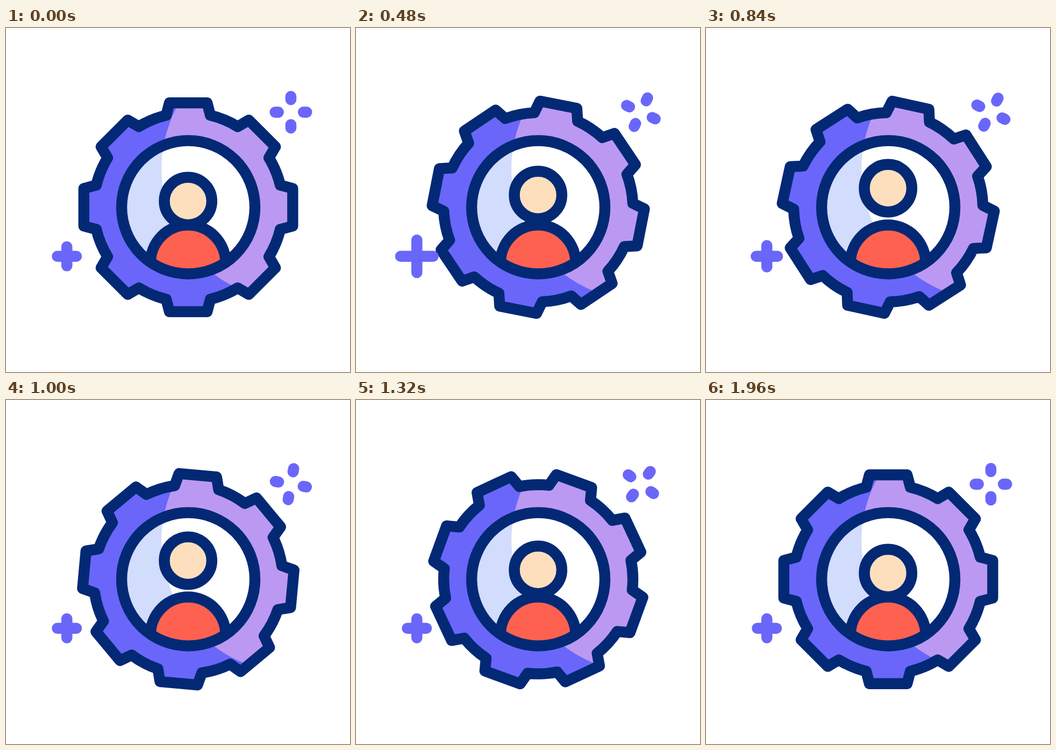
Recreate the animation shown at these times as an HTML page. Size 640x640 px, loop 2000 ms.

```html
<!DOCTYPE html>
<html lang="en">
<head>
<meta charset="utf-8">
<title>Profile settings</title>
<style>
  html, body { margin: 0; width: 100%; height: 100%; overflow: hidden; background: #fff; }
  svg { display: block; width: 100%; height: 100%; }

  .line { stroke: #032975; stroke-width: 20.4; stroke-linejoin: round; }
  .accent { fill: none; stroke: #6a66fa; stroke-width: 20.6; stroke-linecap: round; }

  .spin, .unspin, .sparkle, .plus, .head {
    animation: turn 2s cubic-bezier(.6, 0, .4, 1) infinite;
  }
  .spin { --turn: 180deg; }
  .unspin { --turn: -180deg; }
  .sparkle { animation-name: twirl; }
  .plus { animation-name: grow; }
  .head { animation-name: nod; }

  @keyframes turn {
    0%, 4% { rotate: 0deg; }
    94%, 100% { rotate: var(--turn); }
  }
  @keyframes twirl {
    0%, 2% { rotate: 0deg; }
    96%, 100% { rotate: 360deg; }
  }
  @keyframes grow {
    0%, 3%, 49%, 100% { d: path("M-17.7 0H17.7M0 -17.7V17.7"); }
    28% { d: path("M-30.6 0H30.6M0 -30.6V30.6"); }
  }
  @keyframes nod {
    0%, 6.5%, 80%, 100% { translate: 0 0; }
    42.5%, 44% { translate: 0 -24px; }
  }
</style>
</head>
<body>
<svg viewBox="0 0 640 640">
  <defs>
    <path id="gear"/>
    <clipPath id="gearClip"><use href="#gear"/></clipPath>
    <clipPath id="holeClip"><circle r="124"/></clipPath>
  </defs>

  <g transform="translate(339.1 333.5)">
    <!-- The shading stays upright while the gear turns -->
    <g class="spin">
      <g clip-path="url(#gearClip)">
        <g class="unspin">
          <circle r="230" fill="#6a66fa"/>
          <circle cx="195.4" cy="-71.5" r="245.3" fill="#bb99f2"/>
        </g>
      </g>
      <use href="#gear" class="line" fill="none"/>
    </g>

    <g clip-path="url(#holeClip)">
      <circle r="124" fill="#d2dcfc"/>
      <circle cx="195.4" cy="-71.5" r="245.3" fill="#fff"/>
      <circle class="head line" cx="-.4" cy="-11.5" r="44.2" fill="#fddfbd"/>
      <ellipse class="line" cx="-.4" cy="104" rx="70" ry="71" fill="#ff6151"/>
    </g>
    <circle class="line" r="124" fill="none"/>
  </g>

  <g transform="translate(530 156.6)">
    <path class="sparkle accent" d="M0 -29.3V-23.3M0 23.3V29.3M-29.3 0H-23.3M23.3 0H29.3"/>
  </g>
  <g transform="translate(113.2 424.7)">
    <path class="plus accent" d="M-17.7 0H17.7M0 -17.7V17.7"/>
  </g>
</svg>
<script>
  const TEETH = 8, RIM = 176, BASE = 13.5;
  const TIP = Math.hypot(35, 194.3);
  const TIP_ANGLE = Math.atan2(35, 194.3) * 180 / Math.PI;

  const point = (r, deg) => {
    const a = deg * Math.PI / 180;
    return `${(r * Math.sin(a)).toFixed(2)} ${(-r * Math.cos(a)).toFixed(2)}`;
  };

  let d = "";
  for (let i = 0; i < TEETH; i++) {
    const mid = i * 360 / TEETH;
    const start = point(RIM, mid - BASE);
    d += i ? `A${RIM} ${RIM} 0 0 1 ${start}` : `M${start}`;
    d += `L${point(TIP, mid - TIP_ANGLE)}L${point(TIP, mid + TIP_ANGLE)}L${point(RIM, mid + BASE)}`;
  }
  d += `A${RIM} ${RIM} 0 0 1 ${point(RIM, -BASE)}Z`;
  document.getElementById("gear").setAttribute("d", d);
</script>
</body>
</html>
```
